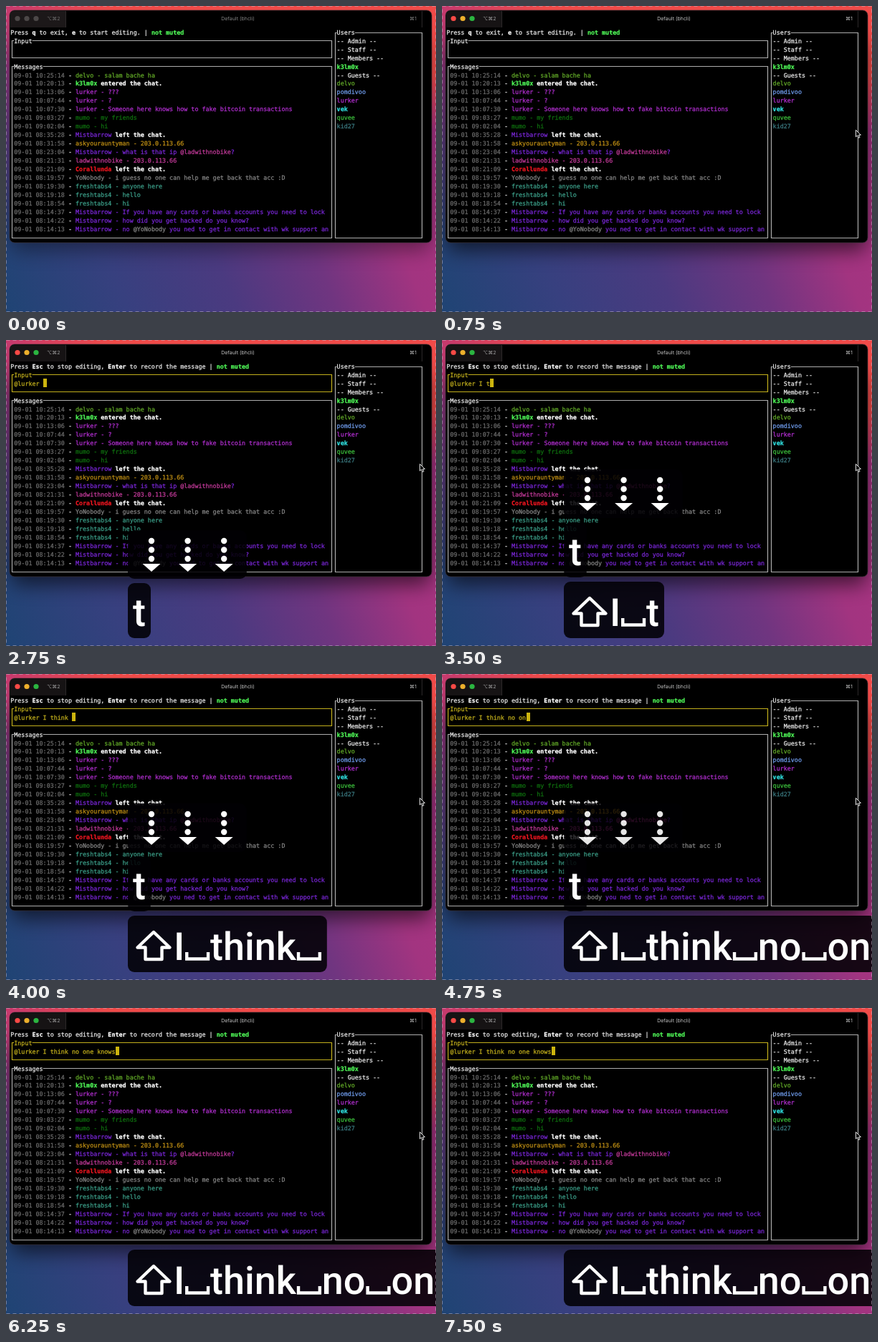
An HTML page that plays this animation: 600x428 px, repeating every 8000 ms.

```html
<!DOCTYPE html>
<html lang="en">
<head>
<meta charset="utf-8">
<title>Terminal chat</title>
<style>
html, body { margin: 0; width: 100%; height: 100%; overflow: hidden; }
body {
  background:
    radial-gradient(85% 42% at 75% 0, #f04a48 60%, rgba(225,60,100,0)),
    linear-gradient(to bottom, rgba(195,48,125,.9), rgba(150,45,125,.4) 45%, rgba(120,40,120,0) 75%),
    linear-gradient(68deg, #1f4474, #37407f 22%, #4b3a80 42%, #703580 60%, #a23480 76%, #b03484);
}
svg { display: block; width: 100%; height: 100%; }
text { white-space: pre; text-rendering: geometricPrecision; }
.mono { font: 8.4px "DejaVu Sans Mono", monospace; stroke-width: .25; }
.bar { font: 7px Inter, "DejaVu Sans", sans-serif; }
.key { font: 500 54px Roboto, Arial, sans-serif; fill: #fff; }
.box { fill: none; stroke: #adadad; stroke-width: 1.2; }
.b { font-weight: bold; }
</style>
</head>
<body>
<svg viewBox="0 0 600 428">
  <defs>
    <filter id="blur" x="-20%" y="-20%" width="140%" height="150%"><feGaussianBlur stdDeviation="14"/></filter>
  </defs>
  <rect id="shadow" x="8" y="50" width="584" height="292" rx="8" filter="url(#blur)"/>
  <rect x="5" y="6" width="589" height="325" rx="7" fill="#000" stroke="#3a3338" stroke-width=".7"/>
  <path id="tab" d="M5.4 30V13a6.6 6.6 0 0 1 6.6-6.6H83V30Z"/>
  <path d="M83.5 7V30M580.5 7V30" stroke="#2c2829"/>
  <g id="lights"><circle cx="16" cy="17.5" r="3.6"/><circle cx="29" cy="17.5" r="3.6"/><circle cx="42" cy="17.5" r="3.6"/></g>
  <g id="title" class="bar">
    <text x="57" y="20" opacity=".8">⌥⌘2</text>
    <text x="323.5" y="20" text-anchor="middle">Default (bhcli)</text>
    <text x="563" y="20">⌘1</text>
  </g>
  <g id="term" class="mono"></g>
  <g id="live" class="mono"></g>
  <path id="mouse" d="M.5 .5V10L2.8 8L4.4 11.4L6 10.7L4.5 7.4H7.4Z" fill="#000" stroke="#fff" stroke-width=".9"/>
  <g id="keys"></g>
  <rect x=".5" y=".5" width="599" height="427" fill="none" stroke="#c8bccb" stroke-opacity=".5" stroke-dasharray="5 4"/>
</svg>
<script>
const LOOP = 8000, STEP = 250;
const CW = 5.06, LH = 11.96, X0 = 6.2, Y0 = 37;
const $ = id => document.getElementById(id);
const colX = c => X0 + c * CW;
const rowY = r => Y0 + r * LH;
const crisp = v => Math.floor(v) + .5;

const WHITE = '#ececec', GREY = '#6a6a6a', LIME = '#50fa58', YELLOW = '#c3b01c';
const colors = {
  delvo: '#63ab28', k3lm0x: LIME, lurker: '#b32fd2', mumo: '#0f720f',
  Mistbarrow: '#7b27d9', askyourauntyman: '#c19014', ladwithnobike: '#c63b9c',
  Corallunda: '#ee1620', YoNobody: '#868686', freshtabs4: '#3ca08a',
  pomdivoo: '#6f9cec', vek: '#30e2e2', quvee: '#3cc03c', kid27: '#3b7b82'
};

const messages = [
  ['10:25:14', 'delvo', 'salam bache ha'],
  ['10:20:13', 'k3lm0x', 'entered the chat.', 1],
  ['10:13:06', 'lurker', '???'],
  ['10:07:44', 'lurker', '?'],
  ['10:07:30', 'lurker', 'Someone here knows how to fake bitcoin transactions'],
  ['09:03:27', 'mumo', 'my friends'],
  ['09:02:04', 'mumo', 'hi'],
  ['08:35:28', 'Mistbarrow', 'left the chat.', 1],
  ['08:31:58', 'askyourauntyman', '203.0.113.66'],
  ['08:23:04', 'Mistbarrow', 'what is that ip @ladwithnobike?'],
  ['08:21:31', 'ladwithnobike', '203.0.113.66'],
  ['08:21:09', 'Corallunda', 'left the chat.', 1],
  ['08:19:57', 'YoNobody', 'i guess no one can help me get back that acc :D'],
  ['08:19:30', 'freshtabs4', 'anyone here'],
  ['08:19:18', 'freshtabs4', 'hello'],
  ['08:18:54', 'freshtabs4', 'hi'],
  ['08:14:37', 'Mistbarrow', 'If you have any cards or banks accounts you need to lock'],
  ['08:14:22', 'Mistbarrow', 'how did you get hacked do you know?'],
  ['08:14:13', 'Mistbarrow', 'no @YoNobody you ned to get in contact with wk support an']
];
const users = ['-- Admin --', '-- Staff --', '-- Members --', 'k3lm0x', '-- Guests --',
  'delvo', 'pomdivoo', 'lurker', 'vek', 'quvee', 'kid27'];

const span = (s, color, bold) =>
  `<tspan fill="${color}" stroke="${color}"${bold ? ' class="b"' : ''}>${s}</tspan>`;
const line = (c, r, body) => `<text x="${colX(c)}" y="${rowY(r) + 2.7}">${body}</text>`;

// Box drawn through cell centres, with a gap in the top edge for its label.
function frame(c1, r1, c2, r2, label, color) {
  const x1 = crisp(colX(c1 + .5)), x2 = crisp(colX(c2 + .5));
  const y1 = crisp(rowY(r1)), y2 = crisp(rowY(r2));
  const style = color ? ` style="stroke:${color}"` : '';
  return `<path class="box"${style} d="M${colX(c1 + 1)} ${y1}H${x1}V${y2}H${x2}V${y1}H${colX(c1 + 1 + label.length)}"/>` +
    line(c1 + 1, r1, span(label, color || WHITE));
}

function message([time, name, text, notice], i) {
  const color = colors[name];
  const body = notice
    ? span(' ' + text, '#fff', true)
    : span(' - ', color) + text.split(/(@\w+)/)
      .map(s => span(s, s[0] === '@' ? colors[s.slice(1)] : color)).join('');
  return line(1, 5 + i, span('09-01 ' + time, GREY) + span(' - ', WHITE) +
    span(name, color, notice && name !== 'Mistbarrow') + body);
}

function terminal(selected) {
  const mark = selected < 0 ? '' :
    `<rect x="11" y="${Math.round(rowY(5 + selected) - 6.5)}" width="440" height="12" fill="${LIME}"/>`;
  return frame(0, 4, 88, 24, 'Messages') + frame(89, 0, 113, 24, 'Users') + mark +
    messages.map(message).join('') +
    users.map((u, i) => line(90, 1 + i, span(u, colors[u] || WHITE, u === 'vek' || u === 'k3lm0x'))).join('');
}

// Help line where *stars* mark bold words.
const help = s => line(0, 0, s.split('*').map((p, i) => span(p, i % 2 ? '#fff' : WHITE, i % 2)).join('') +
  span(' | ', WHITE) + span('not muted', LIME, true));

function prompt(typed) {
  if (typed === null)
    return help('Press *q* to exit, *e* to start editing.') + frame(0, 1, 88, 3, 'Input');
  return help('Press *Esc* to stop editing, *Enter* to record the message') +
    frame(0, 1, 88, 3, 'Input', YELLOW) + line(1, 2, span(typed, YELLOW)) +
    `<rect x="${Math.round(colX(1 + typed.length))}" y="54" width="5" height="12" fill="#ccb40e"/>`;
}

// Keystroke glyphs: * dotted arrow, ^ shift, _ space, anything else is text.
const PAD = 7, LEFT = 170;
const pen = document.createElement('canvas').getContext('2d');
pen.font = '500 54px Roboto, Arial, sans-serif';
const glyphs = {
  '*': [50.6, x => [364, 376.5, 389].map(y => `<circle cx="${x + 26}" cy="${y}" r="4.2" fill="#fff"/>`).join('') +
    `<path d="M${x + 13.5} 396h25l-12.5 11z" fill="#fff"/>`],
  '^': [57, x => `<path d="M${x + 29} 361l22.5 21.5h-11V399h-23v-16.5h-11z" fill="none" stroke="#fff" stroke-width="4.4" stroke-linejoin="round"/>`],
  '_': [35.8, x => `<path d="M${x + 3} 389v9.5h29.8v-9.5" fill="none" stroke="#fff" stroke-width="4.4"/>`]
};

function bubble({ keys, height, lift, alpha }) {
  let x = LEFT + PAD, body = '';
  for (const part of keys.match(/[*^_]|[^*^_]+/g)) {
    const g = glyphs[part];
    body += g ? g[1](x) : `<text class="key" x="${x}" y="400">${part}</text>`;
    x += g ? g[0] : pen.measureText(part).width;
  }
  return `<g transform="translate(0 ${-lift})" opacity="${alpha}">` +
    `<rect x="${LEFT}" y="${417 - height}" width="${x + PAD - LEFT}" height="${height}" rx="9" fill="#020104" fill-opacity=".87"/>${body}</g>`;
}

// Latest value of a [time, value] table.
const at = (table, t) => table.reduce((v, [from, next]) => t >= from ? next : v, null);

const DRAFT = '@lurker I think no one knows', STROKES = '^I_think_no_one_knows';
const draftLen = [[2750, 8], [3250, 9], [3500, 11], [3750, 13], [4000, 16], [4500, 18],
  [4750, 21], [5000, 22], [5250, 23], [5750, 24], [6000, 27], [6250, 28]];
const strokeLen = [[3250, 2], [3500, 4], [3750, 7], [4000, 9], [4500, 11], [4750, 14],
  [5000, 15], [5250, 16], [5750, 17], [6000, 20], [6250, 21]];
const selection = [[0, -1], [1500, 0], [1750, 2], [2750, -1]];
const arrowKeys = [[1500, '*'], [1750, '***']];
const arrowLift = [[0, 0], [2750, 83], [3250, 168]];
const arrowAlpha = [[0, 1], [4750, .9], [5000, .55], [5250, .2], [5500, 0]];
const letterAlpha = [[2750, 1], [5500, .9], [5750, .6], [6000, .2], [6250, 0]];
const mousePos = [[250, '582 178'], [500, '577 173']];

function bubbles(t) {
  const list = [];
  if (t >= 1500) list.push({ keys: at(arrowKeys, t), height: 68, lift: at(arrowLift, t), alpha: at(arrowAlpha, t) });
  if (t >= 2750) list.push({ keys: 't', height: 77, lift: t < 3250 ? 0 : 85, alpha: at(letterAlpha, t) });
  if (t >= 3250) list.push({ keys: STROKES.slice(0, at(strokeLen, t)), height: 79, lift: 0, alpha: 1 });
  return list.filter(b => b.alpha).map(bubble).join('');
}

function draw(t) {
  const active = t >= 750;
  const lamps = active ? ['#fb4a46', '#eeb02c', '#2bb540'] : ['#4c4848', '#4c4848', '#4c4848'];
  [...$('lights').children].forEach((c, i) => c.setAttribute('fill', lamps[i]));
  $('tab').setAttribute('fill', active ? '#161314' : '#1c1819');
  $('title').setAttribute('fill', active ? '#c4c4c4' : '#858585');
  $('shadow').setAttribute('opacity', active ? .6 : .4);
  $('term').innerHTML = terminal(at(selection, t));
  const n = at(draftLen, t);
  $('live').innerHTML = prompt(n === null ? null : DRAFT.slice(0, n));
  const pos = at(mousePos, t);
  $('mouse').setAttribute('visibility', pos ? 'visible' : 'hidden');
  if (pos) $('mouse').setAttribute('transform', `translate(${pos})`);
  $('keys').innerHTML = bubbles(t);
}

let shown = -1;
function tick() {
  const step = Math.floor(performance.now() % LOOP / STEP);
  if (step !== shown) draw((shown = step) * STEP);
  requestAnimationFrame(tick);
}
tick();
</script>
</body>
</html>
```
